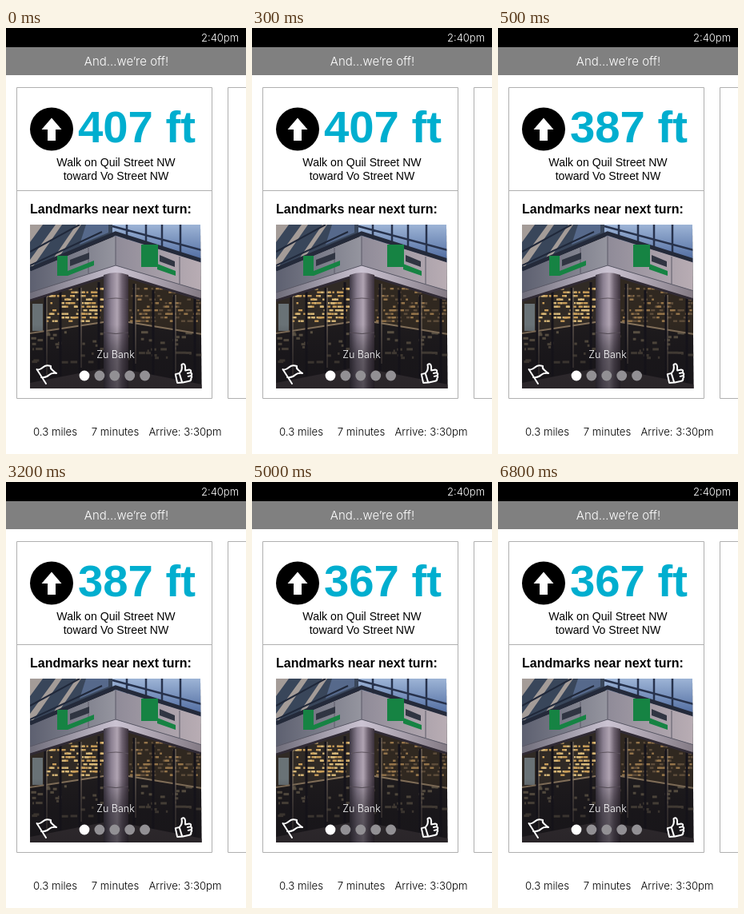
Write an HTML page that moves like this. It is 300 px wide and 533 px high and loops after 8000 ms.

```html
<!DOCTYPE html>
<html lang="en">
<head>
<meta charset="utf-8">
<title>Walking directions</title>
<style>
  html, body { margin: 0; width: 100%; height: 100%; overflow: hidden; background: #fff; }
  svg { display: block; width: 100%; height: 100%; }
  text { font-family: "Liberation Sans", Arial, sans-serif; text-anchor: middle; }
  .light { font-family: Inter, "Liberation Sans", sans-serif; font-weight: 300; }
  .bold { font-weight: 700; text-anchor: start; }
  .icon { fill: none; stroke: #fff; stroke-width: 2; stroke-linejoin: round; stroke-linecap: round; }
</style>
</head>
<body>
<svg viewBox="0 0 300 533">
  <defs>
    <clipPath id="photo"><path d="M30 246h213l1.500 205H30z"/></clipPath>
    <linearGradient id="column">
      <stop offset="0" stop-color="#3d3743"/>
      <stop offset=".3" stop-color="#8a7f90"/>
      <stop offset=".55" stop-color="#b0a4b2"/>
      <stop offset=".75" stop-color="#6e6270"/>
      <stop offset="1" stop-color="#3a303a"/>
    </linearGradient>
    <linearGradient id="leftBand">
      <stop offset="0" stop-color="#5d6070"/>
      <stop offset="1" stop-color="#95959f"/>
    </linearGradient>
    <linearGradient id="rightBand">
      <stop offset="0" stop-color="#8f8b98"/>
      <stop offset="1" stop-color="#b9adb4"/>
    </linearGradient>
    <linearGradient id="soffit">
      <stop offset="0" stop-color="#6f6d7a"/>
      <stop offset=".5" stop-color="#cbc3d2"/>
      <stop offset="1" stop-color="#837a84"/>
    </linearGradient>
    <linearGradient id="sky" x2="0" y2="1">
      <stop offset="0" stop-color="#9db4d6"/>
      <stop offset="1" stop-color="#4a669c"/>
    </linearGradient>
    <linearGradient id="shade" x2="0" y2="1">
      <stop offset="0" stop-color="#141217" stop-opacity="0"/>
      <stop offset=".5" stop-color="#141217" stop-opacity=".5"/>
      <stop offset="1" stop-color="#141217" stop-opacity=".6"/>
    </linearGradient>
  </defs>

  <rect width="300" height="24"/>
  <text class="light" x="267.500" y="17" font-size="13" fill="#fff">2:40pm</text>
  <rect y="24" width="300" height="35" fill="#808080"/>
  <text class="light" x="150.500" y="47" font-size="15" fill="#fff">And...we’re off!</text>

  <g fill="none" stroke="#b0b0b0">
    <path d="M13.500 74.500h244v389h-244zM13.500 203.500h244"/>
    <path d="M301 74.500h-23.500v389h23.500"/>
  </g>

  <circle cx="57" cy="126.500" r="27"/>
  <path d="M57 112.500 69.500 127h-7.500v14h-10v-14h-7.500z" fill="#fff"/>
  <text id="distance" class="bold" x="90" y="143" font-size="56.300" fill="#00aecf"></text>
  <text x="137.500" y="173" font-size="14.100">Walk on Quil Street NW</text>
  <text x="137.500" y="190" font-size="14.100">toward Vo Street NW</text>
  <text class="bold" x="30" y="232" font-size="16">Landmarks near next turn:</text>

  <g clip-path="url(#photo)">
    <rect x="30" y="246" width="215" height="205" fill="#1e1b1d"/>
    <!-- upper storeys -->
    <path d="M30 246h103v14l-103 44z" fill="#39465a"/>
    <path d="M30 246h16l-16 22zM62 246h8l-36 52h-4v-8zM88 246h6l-28 41-8 3z" fill="#a49c98"/>
    <path d="M100 246h28v10l-36 15z" fill="#56698b"/>
    <path d="M30 280 92 246M30 297l90-42" stroke="#20283a" stroke-width="2"/>
    <path d="M133 246h112v48l-112-34z" fill="url(#sky)"/>
    <path d="M151 246v25M175 246v29M195 246v34M218 246v41M133 248l112 30" stroke="#27324c" stroke-width="2.500"/>
    <!-- storefront -->
    <path d="M30 338 122 308v60l-92 13z" fill="#302a25"/>
    <path d="M153 308 245 337v48l-92-17z" fill="#302820"/>
    <g id="reflections"></g>
    <path d="M33 345h13v34h-13z" fill="#697276"/>
    <path d="M30 382 122 368M153 368l92 15" stroke="#85725b" stroke-width="2"/>
    <path d="M49 335v106M68 330v106M92 325v108M116 318v112M160 320v110M184 328v110M210 334v108M236 338v108" stroke="#15131a" stroke-width="3"/>
    <path d="M51 335v100M94 325v100M162 320v100M212 334v100" stroke="#817566"/>
    <path d="M30 444 122 426v25H30zM153 428l92 18v5h-92z" fill="#4a4244"/>
    <!-- sign band and corner column -->
    <path d="M30 304 137 260v37l-107 34z" fill="url(#leftBand)"/>
    <path d="M137 260 245 293v36l-108-32z" fill="url(#rightBand)"/>
    <path d="M30 331 137 297l108 32v10l-92-27h-31l-92 28z" fill="url(#soffit)"/>
    <path d="M30 302 137 257l108 34" fill="none" stroke="#242a3a" stroke-width="5"/>
    <path d="M30 341 122 312h31l92 28" fill="none" stroke="#302a34" stroke-width="3"/>
    <path d="M30 331 137 297l108 32M103 275v32M137 260v37M217 286v34" fill="none" stroke="#5c5b69"/>
    <path d="M122 309q15-6 31 0v142h-31z" fill="url(#column)"/>
    <path d="M122 340q15-4 31 0M122 381q15 3 31 0" fill="none" stroke="#5b515b"/>
    <!-- plain signs -->
    <path d="M77 304 110 291v6l-33 13zM189 295l23 9v6l-23-8z" fill="#168343"/>
    <path d="M80 290 104 281v8l-24 9zM192 284l19 8v7l-19-7z" fill="#303542"/>
    <rect x="64" y="285" width="13" height="25" fill="#168343"/>
    <rect x="169" y="271" width="21" height="28" fill="#168343"/>
    <rect x="30" y="371" width="215" height="80" fill="url(#shade)"/>
  </g>

  <text class="light" x="137" y="413" font-size="12.500" fill="#fff">Zu Bank</text>
  <g id="dots"></g>
  <path class="icon" d="M38.500 427 50 445M39 428q5-1 8-4t9-1q-1 3 2 5 3 3 5 4-6-1-9 2-4 4-10 3"/>
  <path class="icon" transform="rotate(-12 222 433)" d="M212 431h5q5-3 5-10 4-2 4 3l-1 5h5q3 1 1 4 2 2 0 4 1 2-1 3 0 3-3 3h-8l-7-1zM217 431l1 11M227 433h4M227 437h4"/>

  <g font-size="13.200">
    <text class="light" x="61.500" y="510">0.3 miles</text>
    <text class="light" x="136.500" y="510">7 minutes</text>
    <text class="light" x="224" y="510">Arrive: 3:30pm</text>
  </g>
</svg>
<script>
  const LOOP = 8000;
  const byId = id => document.getElementById(id);
  const repeat = (count, shape) => Array.from({ length: count }, (_, i) => shape(i)).join("");

  let seed = 7;
  const random = () => (seed = seed * 16807 % 2147483647) / 2147483647;

  byId("dots").innerHTML = repeat(5, i =>
    `<circle cx="${98 + i * 18.9}" cy="435" r="6.4" fill="${i ? "#929094" : "#fff"}"/>`);

  // Lit windows mirrored in the storefront glass, brightest in the upper rows.
  const tones = ["#c79c58", "#94744a", "#d8b878", "#5d4c3a"];
  byId("reflections").innerHTML = repeat(230, i => {
    const x = i % 2 ? 154 + random() * 88 : 50 + random() * 70;
    const y = 325 + Math.floor(random() * 10) * 4.5;
    return `<rect x="${x}" y="${y}" width="${2 + random() * 4}" height="2.4" fill="${tones[i % 4]}"/>`;
  }) + repeat(60, () =>
    `<rect x="${30 + random() * 212}" y="${378 + random() * 40}" width="${2 + random() * 7}" height="3" fill="#625848"/>`);

  function draw(now) {
    const time = now % LOOP;
    const feet = time < 500 ? 407 : time < 5000 ? 387 : 367;
    byId("distance").textContent = `${feet} ft`;
    requestAnimationFrame(draw);
  }
  draw(performance.now());
</script>
</body>
</html>
```
